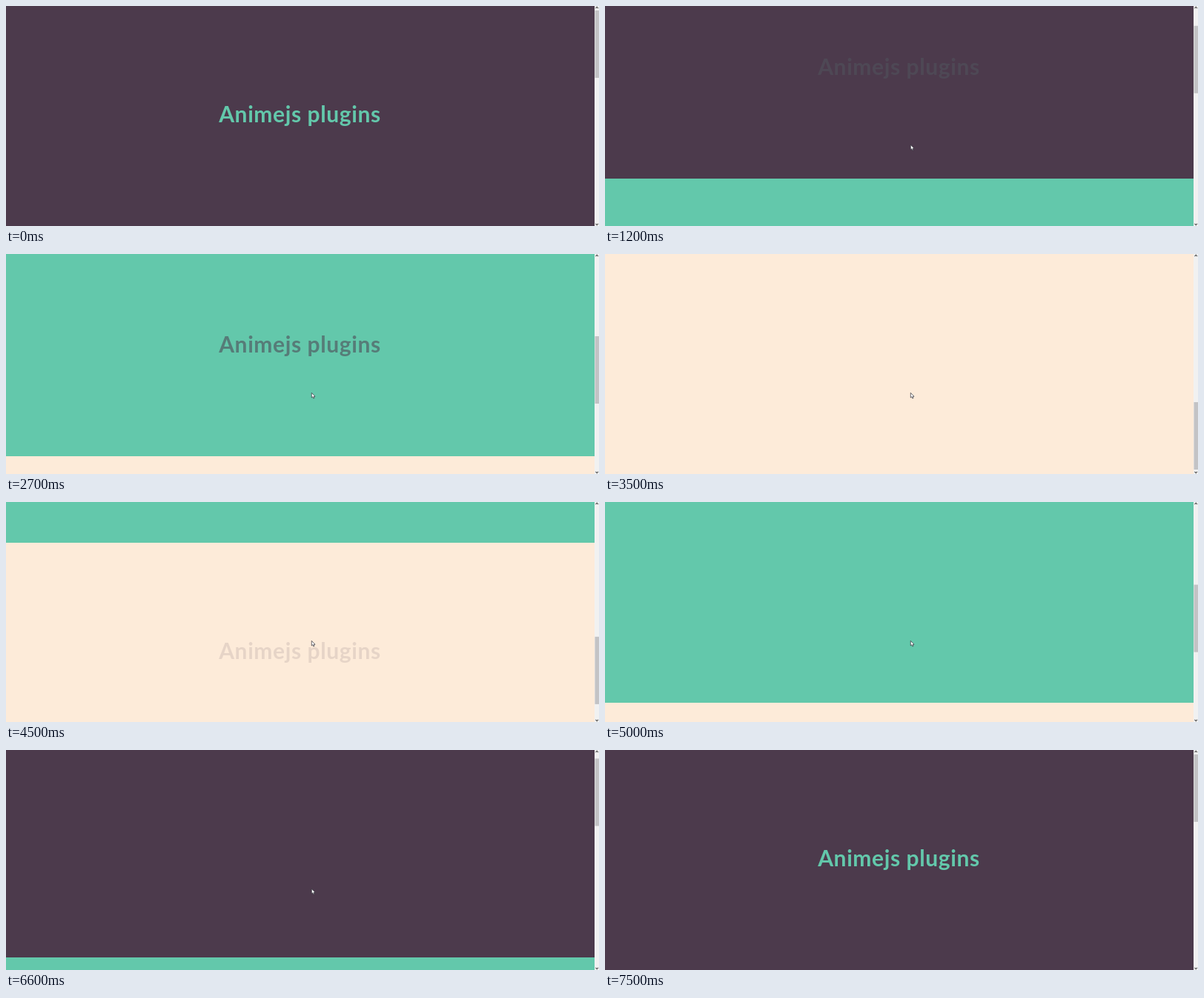
Recreate the animation shown at these times as an HTML page. Size 800 px wide and 297 px high, loop 7600 ms.

```html
<!DOCTYPE html>
<html lang="en">
<head>
<meta charset="utf-8">
<title>Section scroll</title>
<style>
  html, body { margin: 0; width: 100%; height: 100%; overflow: hidden; background: #4c3a4c; }
  svg { display: block; width: 100vw; height: 100vh; }
  text { font: 700 30px Lato, "Open Sans", sans-serif; letter-spacing: .6px; text-anchor: middle; }
</style>
</head>
<body>
<svg viewBox="0 0 800 297">
  <g id="page"></g>
  <rect x="794" width="6" height="297" fill="#f1f1f1"/>
  <rect id="thumb" x="794.5" width="5.5" height="91" fill="#c3c3c5"/>
  <path d="M795.5 3.2 L797.2 1.4 L798.9 3.2 M795.5 293.8 L797.2 295.6 L798.9 293.8"
        fill="none" stroke="#505050" stroke-width="1.1"/>
  <path id="cursor" d="M0.3 0.4 V7 L1.8 5.7 L2.8 8 L4 7.5 L3 5.3 H5 Z"
        fill="#fff" stroke="#303038" stroke-width=".7"/>
</svg>
<script>
const LOOP = 7600, STEP = 100, HEIGHT = 297;
const FADE_OUT = 420, FADE_IN = 600, FADE_DELAY = 80;
const PURPLE = '#4c3a4c', GREEN = '#63c8ab', CREAM = '#fdebd9';
const sections = [
  { fill: PURPLE, ink: GREEN },
  { fill: GREEN, ink: PURPLE },
  { fill: CREAM, ink: PURPLE }
];
const scrolls = [
  { start: 873, time: 1000, from: 0, to: 1 },
  { start: 2497, time: 1000, from: 1, to: 2 },
  { start: 4184, time: 1034, from: 2, to: 1 },
  { start: 5769, time: 1000, from: 1, to: 0 }
];
// Pointer keys: time, x, y
const pointer = [
  [100, 277, 250], [200, 350, 204], [300, 436, 158], [400, 494, 142],
  [500, 466, 160], [600, 428, 180], [700, 412, 187],
  [7000, 412, 187], [7100, 370, 196], [7200, 260, 226], [7300, 130, 264], [7400, 50, 284]
];

const byId = id => document.getElementById(id);
const page = byId('page'), thumb = byId('thumb'), cursor = byId('cursor');

function add(name, attrs) {
  const node = document.createElementNS('http://www.w3.org/2000/svg', name);
  for (const key in attrs) node.setAttribute(key, attrs[key]);
  return page.appendChild(node);
}

const titles = sections.map(({ fill, ink }, i) => {
  add('rect', { y: i * HEIGHT, width: 794, height: HEIGHT, fill });
  const title = add('text', { x: 396.5, y: i * HEIGHT + 156.5, fill: ink });
  title.textContent = 'Animejs plugins';
  return title;
});

const clamp = v => Math.min(1, Math.max(0, v));
const mix = (a, b, k) => a + (b - a) * k;
const ease = v => {
  const k = clamp(v);
  return k < .5 ? 2 * k * k : 1 - 2 * (1 - k) ** 2;
};

function pageState(t) {
  let position = 0;
  const alpha = [1, 0, 0];
  for (const { start, time, from, to } of scrolls) {
    if (t < start) break;
    position = mix(from, to, ease((t - start) / time));
    alpha[from] *= 1 - ease((t - start) / FADE_OUT);
    alpha[to] = ease((t - start - time - FADE_DELAY) / FADE_IN);
  }
  return { position, alpha };
}

function pointerAt(t) {
  const next = pointer.findIndex(key => key[0] >= t);
  if (next < 0 || t < pointer[0][0]) return null;
  const b = pointer[next], a = pointer[Math.max(0, next - 1)];
  const k = a === b ? 0 : (t - a[0]) / (b[0] - a[0]);
  return [mix(a[1], b[1], k), mix(a[2], b[2], k)];
}

function draw(t) {
  const { position, alpha } = pageState(t);
  page.setAttribute('transform', `translate(0 ${-Math.round(position * HEIGHT)})`);
  thumb.setAttribute('y', 6 + position * 97);
  titles.forEach((title, i) => title.setAttribute('opacity', alpha[i]));
  const spot = pointerAt(t);
  cursor.setAttribute('visibility', spot ? 'visible' : 'hidden');
  if (spot) cursor.setAttribute('transform', `translate(${spot})`);
}

const began = performance.now();
function tick() {
  const t = (performance.now() - began) % LOOP;
  draw(Math.floor(t / STEP) * STEP);
  requestAnimationFrame(tick);
}
tick();
</script>
</body>
</html>
```
